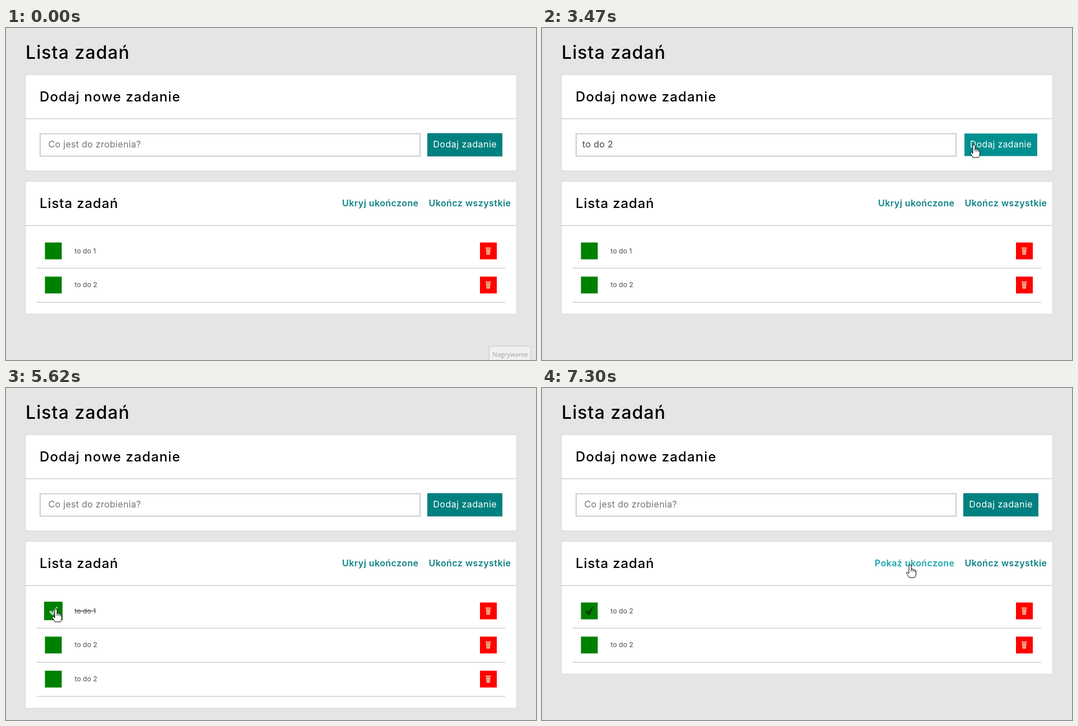
An HTML page for the animation above (8000 ms loop, 946 by 592 pixels).

```html
<!DOCTYPE html>
<html lang="pl">
<head>
<meta charset="utf-8">
<title>Lista zadań</title>
<style>
html, body { margin: 0; width: 100%; height: 100%; overflow: hidden; background: #e5e5e5 }
svg { display: block; font: 16px Inter, "Open Sans", sans-serif; letter-spacing: .02em }
.panel { fill: #fff; stroke: #0000000d; stroke-width: 2; paint-order: stroke }
.line { fill: #d0d0d0 }
.head { font-weight: 500; font-size: 24px; letter-spacing: .037em }
.title { font-size: 32px; letter-spacing: .033em }
.link { font-weight: 600; letter-spacing: .027em; text-anchor: end; fill: #0f8286 }
.link.hover { fill: #16a6a9 }
.focus .link { fill: #009090 }
.task { font-size: 12px; letter-spacing: .01em; fill: #4a4a4a }
.done .task { text-decoration: line-through }
.bin { fill: #f4c8a4 }
.focus .bin { fill: #d8c0c0 }
#field { fill: #fff; stroke: #ccc; stroke-width: 2 }
.focus #field { stroke: #000; rx: 2px }
#typed { white-space: pre; fill: #444 }
</style>
</head>
<body>
<svg id="stage" width="946" height="592" viewBox="0 0 946 592">
  <text class="head title" x="35" y="55">Lista zadań</text>

  <rect class="panel" x="35" y="84" width="876" height="170"/>
  <text class="head" x="60" y="130.5" style="letter-spacing:.047em">Dodaj nowe zadanie</text>
  <rect class="line" x="35" y="161" width="876" height="1.5"/>
  <rect id="field" x="61" y="188.5" width="678" height="40"/>
  <text id="hint" x="75.5" y="213" fill="#757575">Co jest do zrobienia?</text>
  <text id="typed" x="72" y="213"></text>
  <rect id="caret" y="199" width="1" height="18"/>
  <g id="button">
    <rect id="face" x="752" y="187.5" width="134" height="41.5"/>
    <text x="819.2" y="213" fill="#fff" text-anchor="middle" letter-spacing=".03em">Dodaj zadanie</text>
  </g>

  <rect id="list" class="panel" x="35" y="274" width="876"/>
  <text class="head" x="60" y="320.5">Lista zadań</text>
  <text id="toggle" class="link" x="736.5" y="318"></text>
  <text class="link" x="901.5" y="318">Ukończ wszystkie</text>
  <rect class="line" x="35" y="351.5" width="876" height="1.5"/>
  <g id="rows"></g>
  <path id="tick" d="M77 399L80.500 396.500 83 400Q86 393.500 91 389.500L92.500 390.500Q88 396 85 405H82Z"/>

  <g id="tip">
    <rect x="862.5" y="567.5" width="74" height="30" fill="#f0f0f0" stroke="#c8c8c8"/>
    <text x="868" y="586" fill="#a0a0a0" style="font:11.5px 'Open Sans',sans-serif;letter-spacing:0">Nagrywanie</text>
  </g>

  <g id="pointer" fill="#fff" stroke="#000" stroke-linejoin="round">
    <path id="arrow" d="M0 0V16l3.700-3.500 2.600 6 2.200-1-2.600-5.800H11Z"/>
    <path id="beam" fill="none" d="M-3.500-7.500h3M.5-7.500h3M-3.500 7.500h3M.5 7.500h3M0-7V7"/>
    <path id="hand" d="M-2 14V2a2 2 0 0 1 4 0V8q3-1.500 3.300 .8 2.500-1 3 1.200 2.200-.6 2.200 2V17q0 3-2 5.500V23H-1.500Q-3 20-6 16q-1-1.600 0-2.400 1.800-1 4 2ZM2 8v4M5.300 9v3.500M8.300 10.500v2.500"/>
  </g>
</svg>
<script>
const LOOP = 8000, PITCH = 60.8, FRAME = 68;
const BLUR = 3470, ADD = 3550, CHECK = 5620, HIDE = 7160;
const $ = id => document.getElementById(id);
const show = (id, on) => $(id).style.display = on ? '' : 'none';
const zoom = (el, x, y, s) => el.setAttribute('transform', `translate(${x} ${y}) scale(${s}) translate(${-x} ${-y})`);

// Times at which the field gains a character, starting with its focus
const typing = [[540, ''], [810, 't'], [1460, 'to'], [1530, 'to '], [1730, 'to d'],
  [1820, 'to do'], [1910, 'to do '], [2320, 'to do 2']];

// Pointer path: time, x, y
const path = [[70, 905, 588], [138, 700, 485], [206, 400, 330], [274, 230, 235], [338, 174, 212],
  [2700, 174, 212], [2720, 190, 211], [2990, 675, 195], [3190, 768, 206], [3260, 771, 208],
  [3680, 771, 208], [3800, 690, 220], [4000, 492, 294], [4300, 194, 365], [4560, 91, 394],
  [4890, 91, 394], [4960, 89, 394], [6140, 89, 394], [6150, 88, 395], [6340, 88, 395],
  [6622, 180, 387], [6980, 640, 318], [7090, 657, 315]];
const starts = [70, 2720, 3550, 6150, 6350];

$('rows').innerHTML = [1, 2, 2].map((n, i) => `<g>
  <rect class="box" x="69.5" y="382.5" width="30" height="30" fill="green"/>
  <text class="task" x="122.5" y="401.5">to do ${n}</text>
  <rect x="846" y="382.5" width="30" height="30" fill="red"/>
  <path class="bin" d="M856 391.500h9.500v2H856ZM857 394.500h7.500l-.7 9.500h-6.100Z"/>
  <path stroke="#c84030" stroke-width=".8" d="M859.500 395.500v7M862 395.500v7"/>
  <rect class="line" x="55" y="427.5" width="836" height="1.5"/></g>`).join('');
const rows = [...$('rows').children];

function pointerAt(t) {
  const base = starts.findLast(s => s <= t) ?? 0;
  const q = base + Math.floor((t - base + 12) / FRAME) * FRAME;
  const i = path.findIndex(p => p[0] > q);
  if (i < 0) return path.at(-1).slice(1);
  const [t0, x0, y0] = path[Math.max(i - 1, 0)], [t1, x1, y1] = path[i];
  const k = Math.max(0, (q - t0) / (t1 - t0 || 1));
  return [x0 + (x1 - x0) * k, y0 + (y1 - y0) * k];
}

function draw(t) {
  const [x, y] = pointerAt(t);
  const over = (l, top, r, b) => x >= l && x < r && y >= top && y < b;
  const onField = over(60, 187, 740, 229), onButton = over(752, 187, 886, 229);
  const onLink = over(598, 303, 736, 324), onBox = over(68, 381, 101, 414);
  const kind = onField ? 'beam' : onButton || onLink || onBox ? 'hand' : 'arrow';
  show('pointer', t >= 70);
  for (const id of ['arrow', 'beam', 'hand']) show(id, id === kind);
  $('pointer').setAttribute('transform', `translate(${Math.round(x)} ${Math.round(y)})`);

  const focus = t >= 540 && t < BLUR;
  const [since, text] = t < ADD && typing.findLast(k => k[0] <= t) || [0, ''];
  $('stage').classList.toggle('focus', focus);
  $('typed').textContent = text;
  show('hint', !text);
  show('caret', focus && Math.floor((t - since) / 530) % 2 === 0);
  $('caret').setAttribute('x', Math.round(72 + (text && $('typed').getComputedTextLength())));
  show('tip', t < 70);

  zoom($('button'), 819, 208, onButton ? .97 : 1);
  $('face').setAttribute('fill', onButton ? '#009090' : '#008080');

  // Visible rows close ranks when the finished one is hidden
  const hidden = t >= HIDE, done = t >= CHECK && !hidden;
  const shown = rows.map((_, i) => i === 0 ? !hidden : i === 1 || t >= ADD);
  let n = 0;
  rows.forEach((row, i) => {
    row.style.display = shown[i] ? '' : 'none';
    if (shown[i]) row.setAttribute('transform', `translate(0 ${PITCH * n++})`);
  });
  $('list').setAttribute('height', 114 + PITCH * n);
  rows[0].classList.toggle('done', done);
  const grow = t >= 4560 && t < 6680 ? 1.1 : 1;
  zoom(rows[0].querySelector('.box'), 84.5, 397.5, grow);
  show('tick', t >= CHECK);
  $('tick').setAttribute('fill', hidden ? '#043c04' : t < 5750 ? '#a8d0a8' : '#fff');

  $('toggle').textContent = hidden ? 'Pokaż ukończone' : 'Ukryj ukończone';
  $('toggle').classList.toggle('hover', onLink);
}

const begin = performance.now();
function tick() {
  draw((performance.now() - begin) % LOOP);
  requestAnimationFrame(tick);
}
tick();
</script>
</body>
</html>
```
